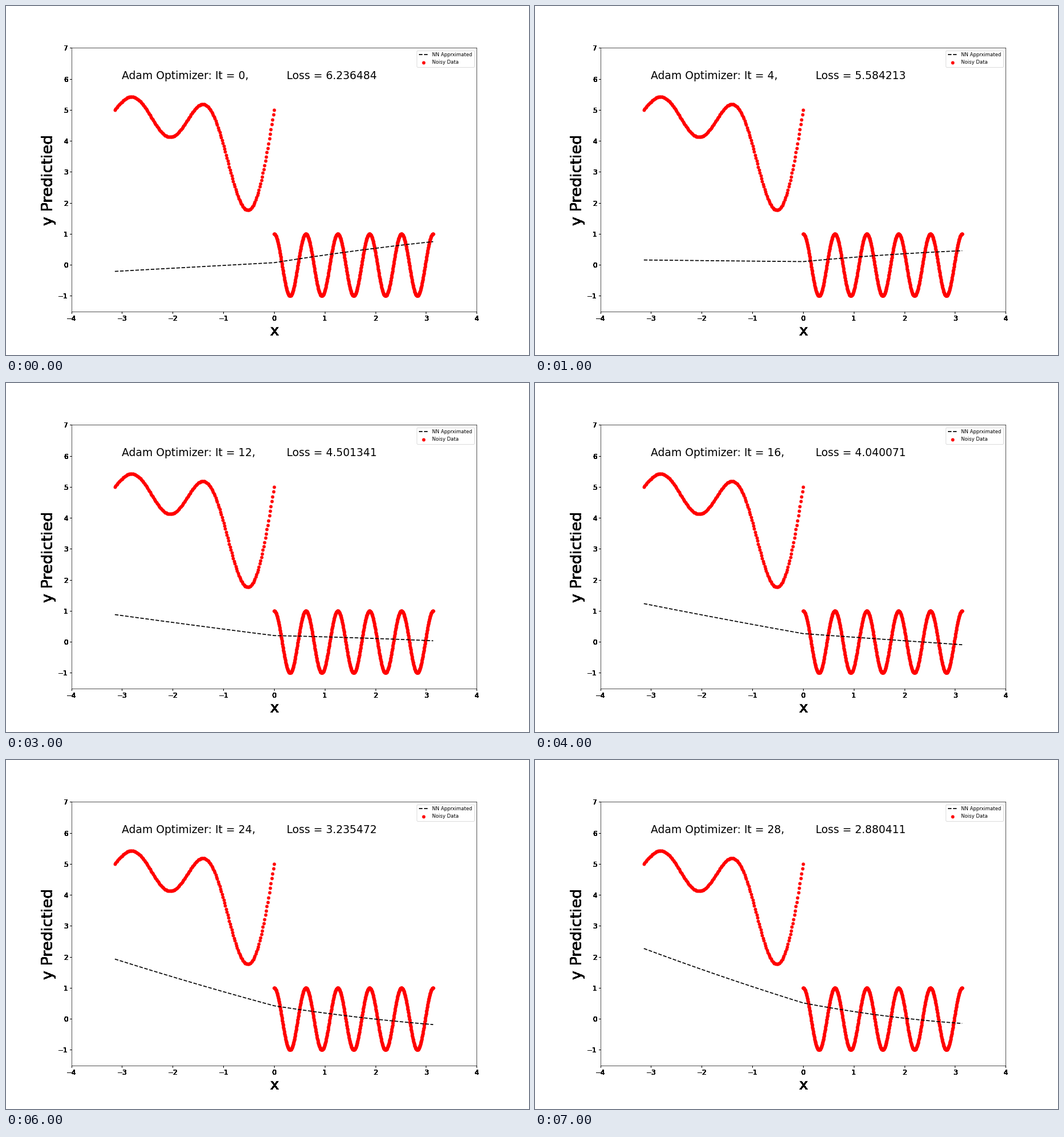
These frames come from a looping animation (917x611 px, 8 s). A matplotlib script:

```python
import numpy as np
import matplotlib.pyplot as plt
from matplotlib.animation import FuncAnimation

W, H, DPI = 917, 611, 61.13
STEP = 4          # training iterations per frame
LAYERS = 20       # ticks and labels are painted repeatedly, which hardens them
LOSSES = [6.236484, 5.584213, 5.012131, 4.501341,
          4.040071, 3.617616, 3.235472, 2.880411]

plt.rcParams["font.family"] = "DejaVu Sans"


def fit(x, it):
    """Network output: two slightly bowed arms that meet at x = 0."""
    start = -0.21 + 0.0925 * it - 0.00014 * it**2
    middle = 0.07 + 0.0075 * it + 0.0003 * it**2
    end = 0.75 - 0.0802 * it + 0.00172 * it**2
    progress = (it / 28) ** 2
    u = np.abs(x) / np.pi
    bow = np.where(x < 0, -0.04 * progress, 0.035 - 0.113 * progress)
    tip = np.where(x < 0, start, end)
    return middle + (tip - middle) * u + 4 * bow * u * (1 - u)


def add_axes(fig, name):
    ax = fig.add_axes([0.125, 0.125, 0.775, 0.755], label=name, facecolor="none")
    ax.set(xlim=(-4, 4), ylim=(-1.5, 7))
    ax.set_xticks(range(-4, 5))
    ax.set_yticks(range(-1, 8))
    ax.tick_params(labelsize=14)
    ax.set_xlabel("x", fontsize=32)
    ax.set_ylabel("y Predictied", fontsize=32)
    return ax


fig = plt.figure(figsize=((W + 0.01) / DPI, (H + 0.01) / DPI), dpi=DPI,
                 facecolor="white")
for i in range(1, LAYERS):
    add_axes(fig, f"layer{i}").spines[:].set_visible(False)
ax = add_axes(fig, "main")

left = np.linspace(-np.pi, 0, 200)
right = np.linspace(0, np.pi, 700)
x = np.concatenate([left, right])
y = np.concatenate([5 + sum(np.sin(k * left) for k in range(1, 5)),
                    np.cos(10 * right)])

line, = ax.plot(x, fit(x, 0), "k--", lw=2, label="NN Apprximated")
dots = ax.scatter(x, y, s=36, color="red", label="Noisy Data")
ax.legend(handles=[line, dots], loc="upper right", fontsize=10)
it_text = ax.text(-3, 6, "", fontsize=22.15)
loss_text = ax.text(0.25, 6, "", fontsize=22.15)


def update(frame):
    it = STEP * frame
    line.set_ydata(fit(x, it))
    it_text.set_text(f"Adam Optimizer: It = {it},")
    loss_text.set_text(f"Loss = {LOSSES[frame]:.6f}")
    return line, it_text, loss_text


anim = FuncAnimation(fig, update, frames=len(LOSSES), interval=1000, repeat=True)
plt.show()
```
